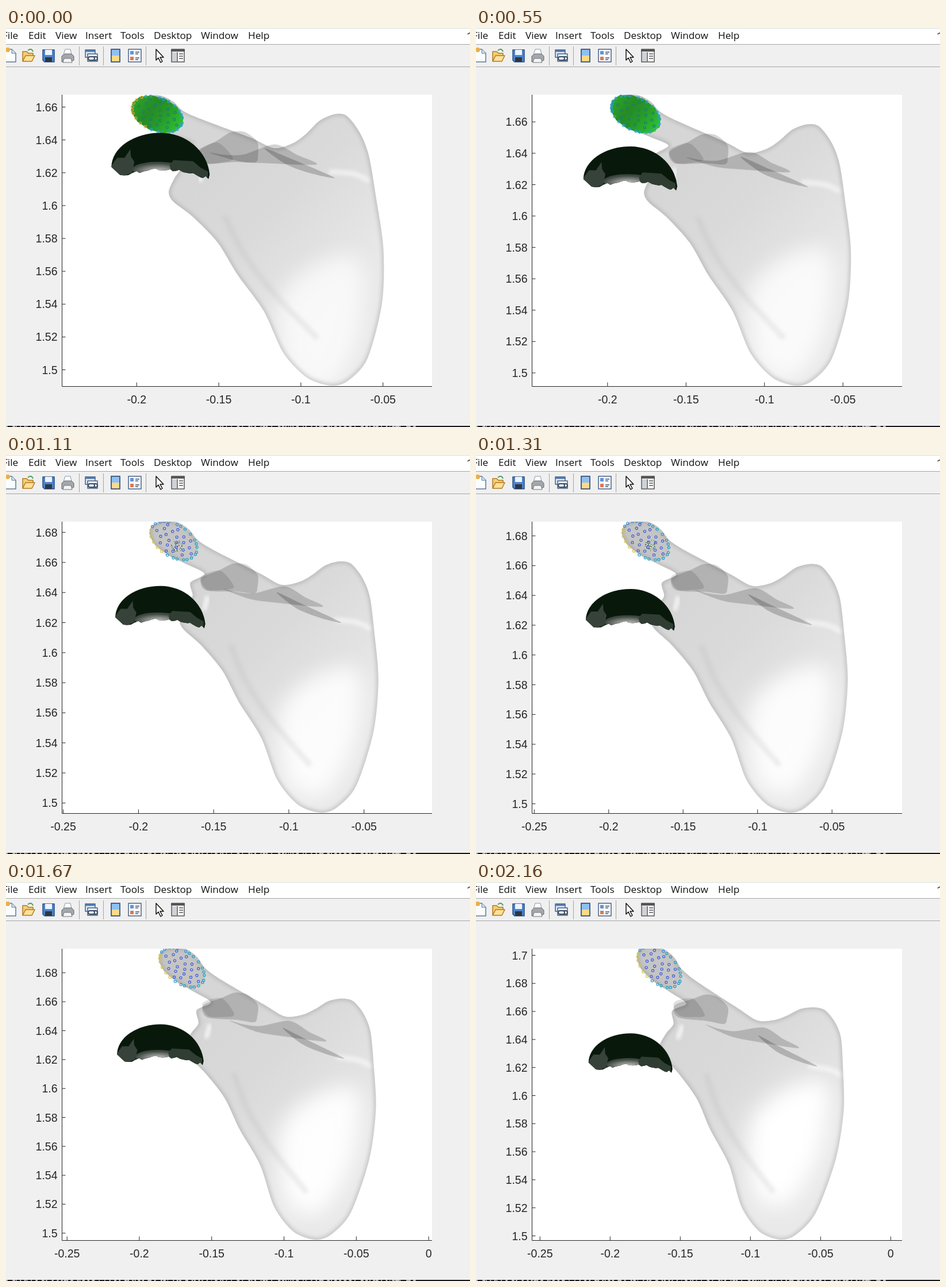
These frames come from a looping animation (807 px wide and 694 px high, 2.23 s). An HTML page:

```html
<!DOCTYPE html>
<html lang="en">
<head>
<meta charset="utf-8">
<title>Scapula motion</title>
<style>
  html, body { margin: 0; width: 100%; height: 100%; overflow: hidden; background: #f0f0f0; }
  svg { display: block; width: 807px; height: 694px; }
  .menu { font: 17.2px "Open Sans", "Noto Sans", sans-serif; fill: #111; }
  .axis text { font: 19.5px "Liberation Sans", Arial, sans-serif; fill: #262626; }
  .axis path { stroke: #262626; fill: none; }
</style>
</head>
<body>
<svg viewBox="0 0 807 694">
  <defs>
    <clipPath id="plot"><rect x="97" y="116" width="644" height="507"/></clipPath>
    <clipPath id="inside"><path id="boneClip"/></clipPath>
    <clipPath id="underCap"><path id="capClip"/></clipPath>
    <filter id="soft" x="-50%" y="-50%" width="200%" height="200%"><feGaussianBlur stdDeviation="3"/></filter>
    <filter id="wide" x="-50%" y="-50%" width="200%" height="200%"><feGaussianBlur stdDeviation="18"/></filter>
    <linearGradient id="boneFill" gradientUnits="userSpaceOnUse" x1="330" y1="270" x2="560" y2="500">
      <stop offset="0" stop-color="#d6d6d6"/><stop offset=".4" stop-color="#dadada"/><stop offset="1" stop-color="#e9e9e9"/>
    </linearGradient>
    <linearGradient id="greenFill" x1="0" y1=".2" x2="1" y2=".8">
      <stop offset="0" stop-color="#2ba52a"/><stop offset=".35" stop-color="#268b25"/>
      <stop offset=".6" stop-color="#27992a"/><stop offset="1" stop-color="#2fc332"/>
    </linearGradient>
    <radialGradient id="cavity" cy=".6">
      <stop offset="0" stop-color="#c4c4c4"/><stop offset=".5" stop-color="#858985"/><stop offset="1" stop-color="#3c463e"/>
    </radialGradient>
  </defs>

  <rect width="807" height="694" fill="#f0f0f0"/>
  <rect width="807" height="28" fill="#fff"/>
  <path d="M0 .5H807" stroke="#d8dfd8"/>
  <path d="M0 28.5H807M0 67.5H807" stroke="#a6a6a6"/>
  <path d="M803 11q2-3 5-2" stroke="#333" stroke-width="1.5" fill="none"/>
  <g class="menu" id="menu"></g>
  <g stroke-linejoin="round">
    <path d="M127.5 32V65M169.5 32V65M243.5 32V65" stroke="#a5a5a5"/>
    <path d="M-4 37H10L17 44V59H-4Z" fill="#fafdff" stroke="#5d7895" stroke-width="1.5"/>
    <path d="M10 37V44H17" fill="#d5e2f0" stroke="#5d7895"/>
    <circle cx="3" cy="38" r="4" fill="#e9b04a"/>
    <path d="M29 58V41H36L39 44H47V48" fill="#f4cf72" stroke="#b37a22" stroke-width="1.5"/>
    <path d="M29 58L34 48H50L45 58Z" fill="#ffe09a" stroke="#b37a22" stroke-width="1.5"/>
    <path d="M38 39Q44 34 47 41" fill="none" stroke="#55a060" stroke-width="2"/>
    <path d="M64 38H84V59H67L64 56Z" fill="#4c83c8" stroke="#2d5188" stroke-width="1.5"/>
    <path d="M68 38H80V47H68Z" fill="#eef3fa"/><path d="M68 51H80V59H68Z" fill="#2b3745"/>
    <path d="M100 46L103 37H112L114 46" fill="#fff" stroke="#8a97a8"/>
    <path d="M97 49L102 45H114L118 49V56L112 59H97Z" fill="#a4a8ad" stroke="#62686e"/>
    <path d="M101 53H113L115 60H99Z" fill="#f5f5f5" stroke="#73777b"/>
    <path d="M138 38H155V51H138Z" fill="#d9e7f8" stroke="#4a617f" stroke-width="1.5"/>
    <path d="M138 40H155" stroke="#4974ae" stroke-width="3"/>
    <path d="M142 45H159V58H142Z" fill="#eef4fb" stroke="#4a617f" stroke-width="1.5"/>
    <path d="M146 50h5a3 3 0 0 1 0 6h-5a3 3 0 0 1 0-6m6 0h4a3 3 0 0 1 0 6h-4" fill="none" stroke="#3c4d68" stroke-width="2"/>
    <path d="M183 37H198V59H183Z" fill="#ffd88a" stroke="#48618a" stroke-width="2"/><path d="M184 38H197V48H184Z" fill="#8ec0f2"/>
    <path d="M213 37H235V59H213Z" fill="#f7fafe" stroke="#48618a" stroke-width="1.5"/>
    <path d="M216 40h6v6h-6z" fill="#5f94d8"/><path d="M216 50h6v6h-6z" fill="#e0784c"/>
    <path d="M225 42H232M225 45H230M225 52H232M225 55H230" stroke="#48546a" stroke-width="1.5"/>
    <path d="M261 37V56L265 52L269 60L272 58L268 51H274Z" fill="#fff" stroke="#111" stroke-width="1.5"/>
    <path d="M288 37H310V59H288Z" fill="#fff" stroke="#555" stroke-width="1.5"/>
    <path d="M287 39H311" stroke="#555" stroke-width="4"/><path d="M289 42H297V58H289Z" fill="#cfd3d8"/>
    <path d="M298 42V58M301 45H308M301 49H308M301 53H308" stroke="#555" stroke-width="1.5"/>
  </g>

  <rect x="97" y="116" width="644" height="507" fill="#fff"/>
  <g clip-path="url(#plot)">
    <path id="bone" fill="url(#boneFill)"/>
    <g clip-path="url(#inside)">
      <path id="glow" fill="#fff" filter="url(#wide)"/>
      <path id="streak" fill="none" stroke="#b8b8b8" stroke-width="10" opacity=".22" filter="url(#soft)"/>
      <path id="ridge" fill="none" stroke="#fff" stroke-width="9" opacity=".55" filter="url(#soft)"/>
      <path id="socket" fill="none" stroke="#fff" stroke-width="7" opacity=".8" filter="url(#soft)"/>
      <path id="rim" fill="none" stroke="#929292" stroke-width="6" opacity=".45" filter="url(#soft)"/>
    </g>
    <path id="tip" opacity=".08"/>
    <path id="coracoid" opacity=".16" stroke="#000" stroke-width=".8"/>
    <path id="hook" opacity=".11" stroke="#000" stroke-width=".8"/>
    <path id="spine" opacity=".17" stroke="#000" stroke-width=".6"/>
    <path id="fold" opacity=".2"/>
    <path id="contact" fill="url(#greenFill)"/>
    <path id="specks" fill="#1c5a24"/>
    <g id="dots" fill="none" stroke-width="1.1"></g>
    <g id="dome">
      <path id="cap" fill="#08190b"/>
      <g clip-path="url(#underCap)">
        <ellipse cx="264" cy="246" rx="45" ry="13" fill="url(#cavity)"/>
        <path d="M180 244L193 226L206 226L216 211L217 224L223 233L219 252L198 260Z" fill="#37433a"/>
        <path d="M284 239L291 230L325 232L338 243L351 250L350 270L290 260Z" fill="#2f3d32"/>
      </g>
    </g>
  </g>
  <g class="axis"><path d="M97.5 116V623.5H741"/><path id="ticks"/><g id="labels"></g></g>
  <rect y="692" width="807" height="2" fill="#17171b"/>
  <path id="strip" fill="none" stroke="#e8e8e8" stroke-width="1.5"/>
</svg>
<script>
const LOOP = 2230, STEP = 70, LAST = 31, CONTACT_END = 14, SPECKS_END = 23;
const $ = id => document.getElementById(id);
const set = (id, name, value) => $(id).setAttribute(name, value);
const f = v => v.toFixed(1);

function random(seed) {
  return () => (seed = (seed * 16807) % 2147483647) / 2147483647;
}

// Key points halfway through the rotation; drift is extra travel from depth.
const shapes = {
  bone: { points: `250,128 262,118 282,115 300,118 318,130 333,148 362,166 440,205 478,225 510,220 532,208
    555,191 580,184 600,188 620,213 633,247 641,310 648,390 640,480 610,575 575,614 546,622 508,608 472,565
    444,492 405,430 376,375 338,330 308,303 301,285 312,262 324,245 320,222 345,207 318,192 285,176 260,158 250,142` },
  coracoid: { points: "340,215 372,200 395,189 418,191 437,208 437,230 432,240 400,237 348,235", drift: [-15, -4] },
  hook: { points: "338,216 346,207 374,202 396,229 378,234 350,234", drift: [-15, -6] },
  spine: { points: "378,233 400,238 432,240 484,228 520,247 550,263 470,256 425,250", drift: [5, 9] },
  fold: { points: "470,238 510,256 582,290 545,282 505,266", drift: [9, 15] },
  glow: { points: "475,450 530,390 605,370 618,420 600,520 550,595 490,570", drift: [5, -32] },
  streak: { points: "390,330 418,395 465,465 530,540", open: true },
  ridge: { points: "570,285 610,290 636,302", drift: [5, 20], open: true },
  socket: { points: "350,245 348,257 344,270", drift: [-10, 0], open: true }
};
for (const s of Object.values(shapes)) s.points = s.points.trim().split(/\s+/).map(p => p.split(",").map(Number));

// Screen travel of a bone point; turn runs from -1 to 1.
function move([x, y], turn, [dx, dy] = [0, 0]) {
  const height = Math.min(1, (622 - y) / 440);
  return [
    x + turn * (54 - .056 * x - .067 * y + dx),
    y + turn * (37 * (x - 300) / 300 * height ** 3 + dy)
  ];
}

// Catmull-Rom spline as cubic segments.
const pair = p => f(p[0]) + " " + f(p[1]);
function curve(p, open) {
  const n = p.length;
  const at = i => open ? p[Math.max(0, Math.min(n - 1, i))] : p[(i + n) % n];
  let d = "M" + pair(p[0]);
  for (let i = 0; i < (open ? n - 1 : n); i++) {
    const [a, b, c, e] = [at(i - 1), at(i), at(i + 1), at(i + 2)];
    const c1 = b.map((v, j) => v + (c[j] - a[j]) / 7);
    const c2 = c.map((v, j) => v - (e[j] - b[j]) / 7);
    d += "C" + [c1, c2, c].map(pair).join(" ");
  }
  return d + (open ? "" : "Z");
}

// Point on the tilted ellipse of the bone's tip.
function onTip(angle, radius = 1) {
  const u = 47 * radius * Math.cos(angle), v = 29 * radius * Math.sin(angle), tilt = .56;
  return [291 + u * Math.cos(tilt) - v * Math.sin(tilt), 149 + u * Math.sin(tilt) + v * Math.cos(tilt)];
}

const RIM = 26, INNER = 22, dots = [];
function makeDots() {
  const rnd = random(5);
  for (let i = 0; i < RIM + INNER; i++) {
    const inner = i >= RIM, n = i - RIM;
    const angle = inner ? n * 2.4 : (i + .6 * rnd()) / RIM * 2 * Math.PI;
    const radius = inner ? .82 * Math.sqrt((n + .5) / INNER) : .95;
    const el = document.createElementNS("http://www.w3.org/2000/svg", "circle");
    el.setAttribute("r", 2.1);
    $("dots").append(el);
    dots.push({ el, inner, angle, place: onTip(angle, radius) });
  }
}

function dotColor({ inner, angle, place }, k) {
  if (k < CONTACT_END) {
    if (inner) return "#187f6b";
    return k < 4 && place[0] < 270 ? "#e9a53a" : "#2aa2dc";
  }
  if (inner) return "#3d58dc";
  if (angle > 1.7 && angle < 3) return "#d5c450";
  return angle > 3 && angle < 4.5 ? "#2d8ee0" : "#17a0c6";
}

function drawTip(k, turn) {
  const outline = Array.from({ length: 12 }, (_, i) => move(onTip(i * Math.PI / 6), turn));
  const d = "M" + outline.map(pair).join("L") + "Z";
  set("tip", "d", d);
  set("contact", "d", d);
  set("contact", "visibility", k < CONTACT_END ? "visible" : "hidden");

  for (const dot of dots) {
    const [x, y] = move(dot.place, turn);
    dot.el.setAttribute("cx", f(x));
    dot.el.setAttribute("cy", f(y));
    dot.el.setAttribute("stroke", dotColor(dot, k));
  }

  let specks = "";
  if (k >= CONTACT_END && k < SPECKS_END) {
    const rnd = random(71 + k * 13), [x, y] = move([295, 159], turn, [25, -18]);
    for (let i = 0; i < 50; i++) {
      const a = rnd() * 2 * Math.PI, r = 10 * Math.sqrt(rnd());
      specks += `M${Math.round(x + r * Math.cos(a))} ${Math.round(y + r * Math.sin(a))}h1v1h-1z`;
    }
  }
  set("specks", "d", specks);
}

function drawAxis(turn) {
  const scale = 2622 - 208 * turn + 26 * turn * turn;
  const x0 = 230.3 + 3 * turn, y0 = 605 + 10.5 * turn;
  let marks = "", text = "";
  for (let i = 75; i <= 86; i++) {
    const v = i / 50, y = y0 - (v - 1.5) * scale;
    if (y < 116 || y > 623) continue;
    marks += `M97 ${f(y)}h6.5`;
    text += `<text x="89.5" y="${f(y + 7)}" text-anchor="end">${+v.toFixed(2)}</text>`;
  }
  for (let i = -5; i <= 0; i++) {
    const v = i / 20, x = x0 + (v + .2) * scale;
    if (x < 97 || x > 741) continue;
    marks += `M${f(x)} 623v-6.5`;
    text += `<text x="${f(x)}" y="652.5" text-anchor="middle">${v}</text>`;
  }
  set("ticks", "d", marks);
  $("labels").innerHTML = text;
  set("dome", "transform", `translate(${f(x0)} ${f(y0)}) scale(${(scale / 2857).toFixed(4)}) translate(-227 -595)`);
}

function draw(k) {
  const turn = 2 * k / LAST - 1;
  for (const [id, { points, drift, open }] of Object.entries(shapes))
    set(id, "d", curve(points.map(p => move(p, turn, drift)), open));
  for (const copy of ["boneClip", "rim"]) set(copy, "d", $("bone").getAttribute("d"));
  set("glow", "opacity", .85 + .15 * turn);
  drawTip(k, turn);
  drawAxis(turn);
}

function build() {
  const items = { File: -6, Edit: 39, View: 86, Insert: 138, Tools: 199, Desktop: 257, Window: 339, Help: 421 };
  for (const name in items) $("menu").innerHTML += `<text x="${items[name]}" y="19">${name}</text>`;

  const rnd = random(9);
  let cap = "M183 242A86 60 0 0 1 269 182.5A86 80 0 0 1 354 255L352 263";
  for (let x = 347; x > 205; x -= 4 + 4 * rnd())
    cap += `L${f(x)} ${f(243 + 15 * (Math.abs(x - 267) / 80) ** 1.6 + 6 * rnd())}`;
  cap += "L198 256Z";
  set("cap", "d", cap);
  set("capClip", "d", cap);

  let strip = "";
  for (let x = 0; x < 712; x += 3 + rnd() * 9) strip += `M${f(x)} 693h${f(1 + rnd() * 4)}`;
  set("strip", "d", strip);
  makeDots();
}

build();
let shown = -1;
const start = performance.now();
function tick(now) {
  const t = Math.max(0, now - start) % LOOP;
  const k = Math.min(LAST, Math.floor((t + 10) / STEP));
  if (k !== shown) draw(shown = k);
  requestAnimationFrame(tick);
}
tick(start);
</script>
</body>
</html>
```
